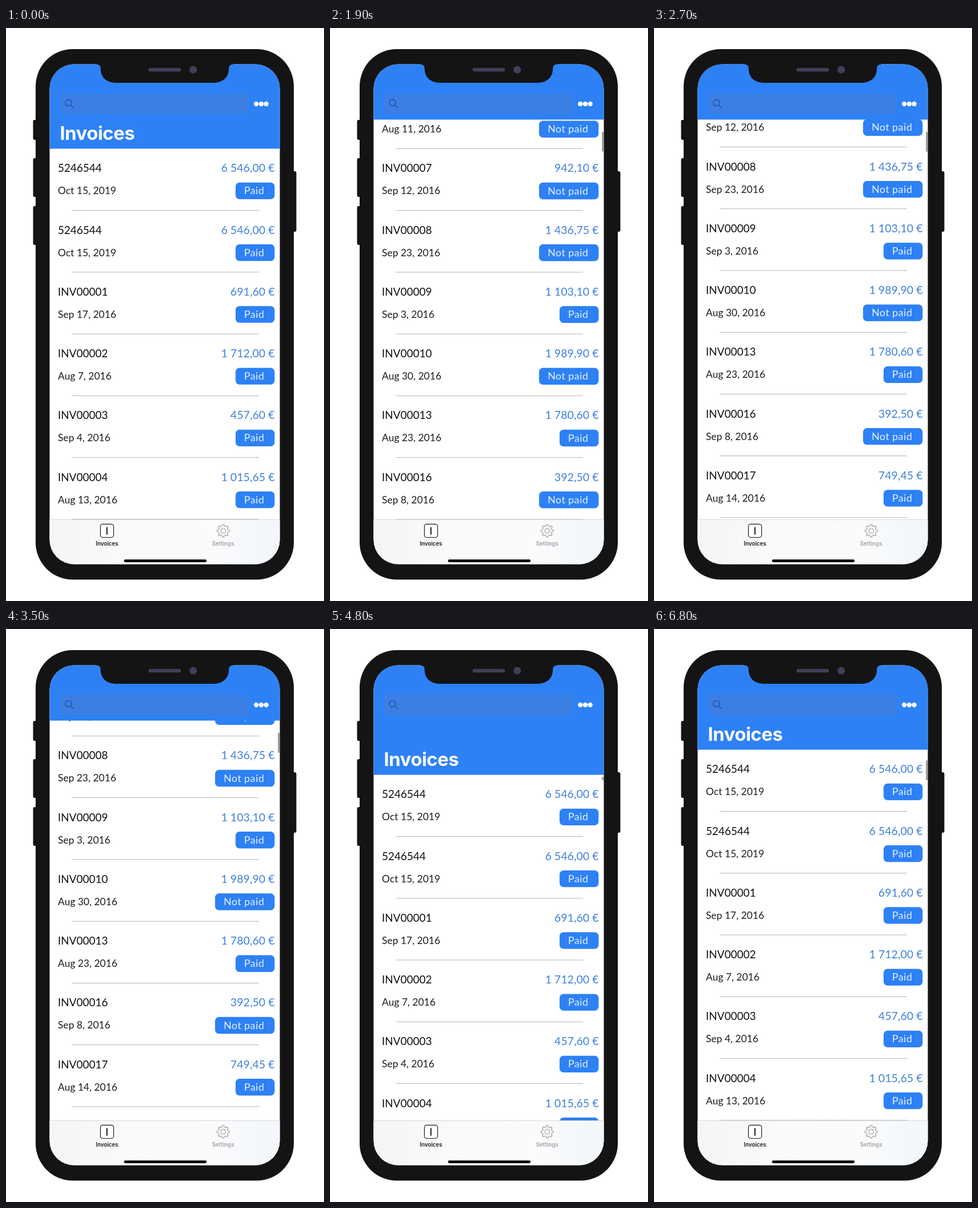
An HTML page for the animation above (7000 ms loop, 558 px wide and 1004 px high).

```html
<!DOCTYPE html>
<html lang="en">
<head>
<meta charset="utf-8">
<title>Invoices</title>
<style>
  html, body { margin: 0; width: 100%; height: 100%; overflow: hidden; background: #fff; }
  svg { display: block; width: 558px; height: 1004px; }
  .list { font-family: Lato, "Open Sans", sans-serif; }
  .number { font-size: 19px; fill: #111; }
  .date { font-size: 17.5px; fill: #1c1c1c; }
  .amount { font-size: 19.4px; letter-spacing: .1px; fill: #3d80da; text-anchor: end; }
  .badge { font-size: 18px; letter-spacing: .4px; fill: #e6effd; text-anchor: middle; }
  .title { font: 700 33px Inter, "Liberation Sans", sans-serif; letter-spacing: -.5px; fill: #fff; }
  .tab { font: 600 9.8px Inter, "Liberation Sans", sans-serif; text-anchor: middle; }
  .blue { fill: #2d81f4; }
</style>
</head>
<body>
<svg viewBox="0 0 558 1004" xmlns="http://www.w3.org/2000/svg">
  <defs>
    <clipPath id="screen"><rect x="76.5" y="63.5" width="404" height="876" rx="43"/></clipPath>
    <clipPath id="titleArea"><rect x="76" y="160" width="405" height="200"/></clipPath>
    <linearGradient id="tabFill">
      <stop offset="0" stop-color="#f4f5f6"/>
      <stop offset=".35" stop-color="#fafafa"/>
      <stop offset=".7" stop-color="#fafbfc"/>
      <stop offset="1" stop-color="#f2f6fa"/>
    </linearGradient>
  </defs>

  <!-- phone body and side buttons -->
  <g fill="#141414">
    <rect x="47.5" y="161" width="12" height="35" rx="3"/>
    <rect x="47.5" y="228" width="12" height="68" rx="3"/>
    <rect x="47.5" y="312" width="12" height="68" rx="3"/>
    <rect x="498" y="251" width="11.5" height="106" rx="3"/>
    <rect x="52" y="37" width="453" height="929.5" rx="65"/>
  </g>

  <g clip-path="url(#screen)">
    <rect x="76" y="63" width="405" height="877" fill="#fff"/>
    <g id="rows" class="list"></g>

    <rect id="header" class="blue" x="76" y="63" width="405" height="148.5"/>
    <g clip-path="url(#titleArea)"><text id="title" class="title" x="94.5" y="196">Invoices</text></g>
    <rect x="94" y="115" width="331" height="36" rx="9" fill="#3b7fe5"/>
    <g fill="none" stroke="#1f4c8c" stroke-width="1.2" stroke-linecap="round">
      <circle cx="109.6" cy="131" r="5.6"/>
      <path d="M113.7 135.2L118.6 140"/>
    </g>
    <g fill="#fff">
      <circle cx="439.2" cy="133" r="4.2"/>
      <circle cx="447.9" cy="133" r="4.2"/>
      <circle cx="456.6" cy="133" r="4.2"/>
    </g>
    <rect id="bar" x="477.2" width="3.3" rx="1.6" fill="#999"/>

    <rect x="76" y="861.5" width="405" height="79" fill="url(#tabFill)"/>
    <rect x="76" y="861" width="405" height="1" fill="#d6d7d9"/>
    <rect x="165.6" y="869.3" width="23.2" height="23.2" rx="3.8" fill="#fff" stroke="#1a1a1a" stroke-width="1.2"/>
    <rect x="176.2" y="874.5" width="1.9" height="13.2" fill="#111"/>
    <text class="tab" x="177.2" y="906.5" fill="#1c1c1c">Invoices</text>
    <g fill="none" stroke="#9a9a9c" stroke-width="1.1" stroke-linejoin="round" transform="translate(381.2 881)">
      <path id="gear"/>
      <circle r="4.3"/>
    </g>
    <text class="tab" x="381" y="906.5" fill="#a2a2a5">Settings</text>
    <rect x="207" y="931.2" width="145" height="4.8" rx="2.4" fill="#050505"/>
  </g>

  <!-- notch -->
  <path fill="#141414" d="M158 62V63.5Q166 63.5 166 71C166 88 178 96 194 96H363C379 96 391 88 391 71Q391 63.5 399 63.5V62Z"/>
  <rect x="250" y="70" width="57" height="6.2" rx="3.1" fill="#413f58"/>
  <circle cx="328.5" cy="73" r="6.6" fill="#413f58"/>
</svg>

<script>
const LOOP = 7000, STEP = 100, PITCH = 108.25;
const el = id => document.getElementById(id);

const invoices = [
  ["5246544", "Oct 15, 2019", "6 546,00", 1],
  ["5246544", "Oct 15, 2019", "6 546,00", 1],
  ["INV00001", "Sep 17, 2016", "691,60", 1],
  ["INV00002", "Aug 7, 2016", "1 712,00", 1],
  ["INV00003", "Sep 4, 2016", "457,60", 1],
  ["INV00004", "Aug 13, 2016", "1 015,65", 1],
  ["INV00005", "Aug 6, 2016", "913,50", 0],
  ["INV00006", "Aug 11, 2016", "429,00", 0],
  ["INV00007", "Sep 12, 2016", "942,10", 0],
  ["INV00008", "Sep 23, 2016", "1 436,75", 0],
  ["INV00009", "Sep 3, 2016", "1 103,10", 1],
  ["INV00010", "Aug 30, 2016", "1 989,90", 0],
  ["INV00013", "Aug 23, 2016", "1 780,60", 1],
  ["INV00016", "Sep 8, 2016", "392,50", 0],
  ["INV00017", "Aug 14, 2016", "749,45", 1]
];

function rowMarkup([number, date, amount, paid], i) {
  const width = paid ? 68.5 : 104.5;
  const left = 471.3 - width;
  return `<g transform="translate(0 ${i * PITCH})">
    <text class="number" x="91" y="252.3">${number}</text>
    <text class="amount" x="471.5" y="252.3">${amount} €</text>
    <text class="date" x="91" y="291.3">${date}</text>
    <rect class="blue" x="${left}" y="270.7" width="${width}" height="29.4" rx="7"/>
    <text class="badge" x="${left + width / 2 - 1.5}" y="291.4">${paid ? "Paid" : "Not paid"}</text>
    <rect x="115" y="319" width="329" height="1" fill="#b5b5b9"/>
  </g>`;
}

function gearPath(teeth, inner, outer) {
  const turn = 2 * Math.PI / teeth;
  const corners = [[-.31, inner], [-.17, outer], [.17, outer], [.31, inner]];
  const points = [];
  for (let i = 0; i < teeth; i++) {
    for (const [offset, r] of corners) {
      const a = (i + offset) * turn;
      points.push((r * Math.sin(a)).toFixed(2) + " " + (-r * Math.cos(a)).toFixed(2));
    }
  }
  return "M" + points.join("L") + "Z";
}

// Scroll offset in px at t seconds: flick down, coast, flick back, bounce at the top.
const coast = t => 1003 - 724 * Math.exp(-2.08 * (t - 1.1));
const glide = t => 654 * (Math.exp(2 * (4.7 - t)) - 1);
const drag = (t, start, end, power) => ((t - start) / (end - start)) ** power;

function scrollAt(t) {
  if (t < .72) return 0;
  if (t < 1.2) return coast(1.2) * drag(t, .72, 1.2, 2.6);
  if (t < 3.95) return coast(Math.min(t, 3.8));
  if (t < 4.33) {
    const from = coast(3.8);
    return from + (glide(4.33) - from) * drag(t, 3.95, 4.33, 3);
  }
  if (t < 4.7) return glide(t);
  if (t < 5.6) return -1309 * (t - 4.7) * Math.exp(-10.9 * (t - 4.7));
  return 0;
}

function draw(t) {
  const scroll = scrollAt(t);
  const shift = -Math.min(scroll, 51);
  const over = Math.max(0, -scroll);
  const length = Math.max(6, 35 - over);
  const barEnd = 265 + Math.min(shift, 0) + Math.max(scroll, 0) * .003;

  el("rows").setAttribute("transform", `translate(0 ${-scroll})`);
  el("header").setAttribute("height", 148.5 + shift);
  el("title").setAttribute("y", 196 + shift);
  el("bar").setAttribute("y", barEnd - length);
  el("bar").setAttribute("height", length);
  el("bar").setAttribute("opacity", t < .8 ? 0 : 1);
}

function tick() {
  const time = performance.now() % LOOP;
  draw(Math.floor(time / STEP) * STEP / 1000);
  requestAnimationFrame(tick);
}

el("rows").innerHTML = invoices.map(rowMarkup).join("");
el("gear").setAttribute("d", gearPath(8, 8.4, 11));
tick();
</script>
</body>
</html>
```
